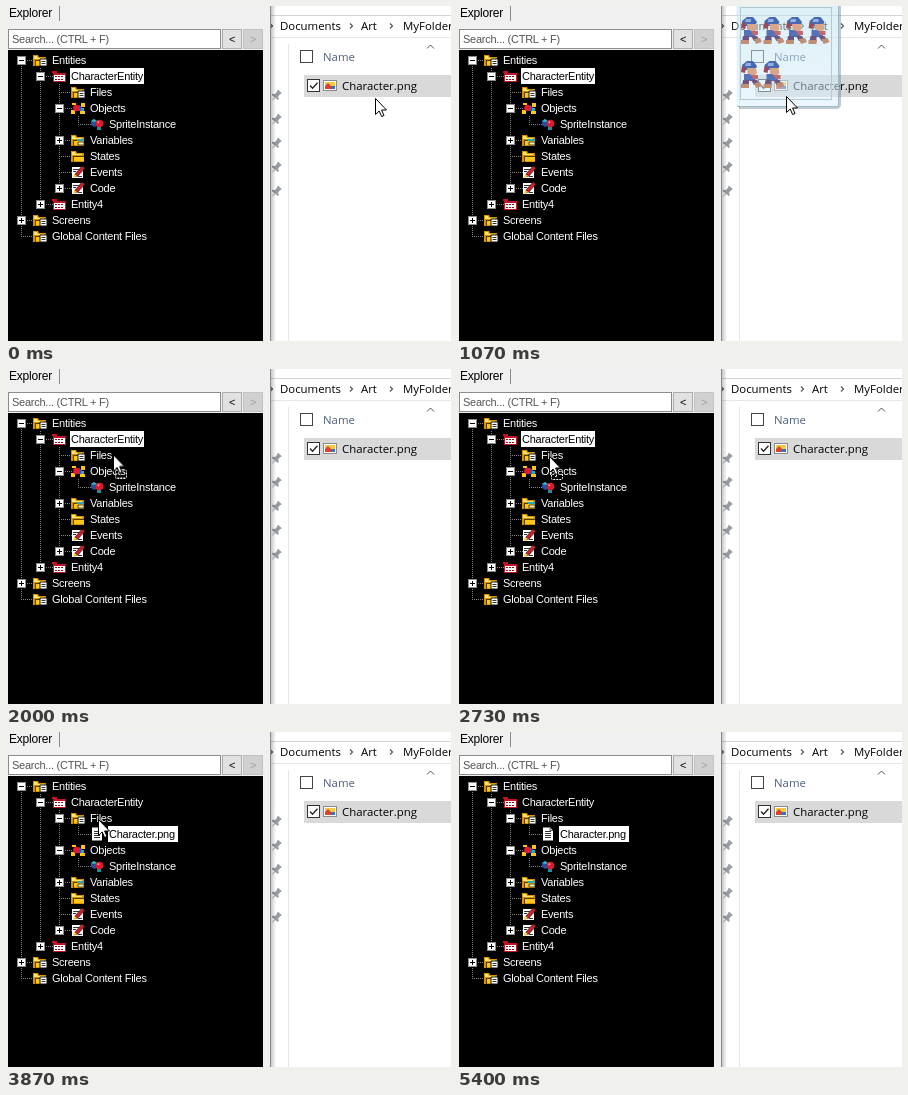
An HTML page for the animation above (5990 ms loop, 445 by 335 pixels).

```html
<!DOCTYPE html>
<html lang="en">
<head>
<meta charset="utf-8">
<title>Drag a file into the tree</title>
<style>
html, body { margin: 0; width: 100%; height: 100%; overflow: hidden; background: #fff; }
svg { display: block; width: 445px; height: 335px; }
text { font: 11.4px "Open Sans", "Noto Sans", sans-serif; fill: #000; }
.ui text { font: 11px "Liberation Sans", Arial, sans-serif; letter-spacing: -.25px; }
.tree text { fill: #fff; }
.tree .sel text { fill: #000; }
.crisp { shape-rendering: crispEdges; }
.dots { stroke: #858585; stroke-dasharray: 1 1; fill: none; }

/* One loop is 5.99 s, drawn at 15 steps per second. */
.anim { animation: 5.99s step-end infinite; }
#cursor { animation-name: move; }
#thumb { animation-name: thumb; }
#ghosts { animation-name: ghosts; }
#badge { animation-name: badge; }
#hover { animation-name: hover; }
#before { animation-name: before; }
#after { animation-name: after; }
#after .old { animation-name: oldSel; }
#after .new { animation-name: newSel; }

@keyframes move {
  0% { transform: translate(369px, 92px); animation-timing-function: steps(3); }
  3.27% { transform: translate(362px, 87px); }
  11.06% { transform: translate(362px, 87px); animation-timing-function: steps(2); }
  13.29% { transform: translate(353px, 87px); animation-timing-function: steps(4); }
  17.74% { transform: translate(329px, 90px); animation-timing-function: steps(2); }
  19.97% { transform: translate(303px, 92px); }
  21.08% { transform: translate(267px, 94px); }
  22.19% { transform: translate(235px, 97px); animation-timing-function: steps(4); }
  26.64% { transform: translate(152px, 96px); animation-timing-function: steps(4); }
  31.1% { transform: translate(112px, 89px); animation-timing-function: steps(4); }
  35.55% { transform: translate(102px, 82px); animation-timing-function: steps(5); }
  41.11% { transform: translate(94px, 96px); animation-timing-function: steps(4); }
  45.57% { transform: translate(92px, 87px); }
  82.29% { transform: translate(92px, 87px); animation-timing-function: steps(3); }
  85.63% { transform: translate(82px, 130px); animation-timing-function: steps(3); }
  88.97% { transform: translate(40px, 298px); }
  90.08%, 100% { transform: translate(40px, 400px); }
}
@keyframes thumb {
  0% { opacity: 0; }
  12.18% { opacity: .5; }
  13.29% { opacity: .9; }
  14.4%, 15.51% { opacity: 1; }
  22.19%, 100% { opacity: 0; }
}
@keyframes ghosts {
  0% { opacity: 0; }
  14.4% { opacity: .5; }
  15.51%, 100% { opacity: 1; }
}
@keyframes badge { 0% { opacity: 0; } 22.19% { opacity: 1; } 58.92%, 100% { opacity: 0; } }
@keyframes hover { 0% { opacity: 0; } 1.05% { opacity: 1; } 12.18%, 100% { opacity: 0; } }
@keyframes before { 0% { opacity: 1; } 61.15%, 100% { opacity: 0; } }
@keyframes after { 0% { opacity: 0; } 61.15%, 100% { opacity: 1; } }
@keyframes oldSel { 0% { opacity: 1; } 64.49%, 100% { opacity: 0; } }
@keyframes newSel { 0% { opacity: 0; } 64.49%, 100% { opacity: 1; } }
</style>
</head>
<body>
<svg viewBox="0 0 445 335">
  <defs>
    <linearGradient id="edge">
      <stop offset="0" stop-color="#000" stop-opacity=".22"/>
      <stop offset="1" stop-color="#000" stop-opacity="0"/>
    </linearGradient>
    <linearGradient id="glass" x2="0" y2="1">
      <stop offset="0" stop-color="#b9e0f0"/>
      <stop offset="1" stop-color="#d8eef8"/>
    </linearGradient>

    <!-- tree icons, 14 by 13 around the centre -->
    <g id="folder">
      <path d="M-7-5h5l1 2h7v9H-7z" fill="#d89400"/>
      <path d="M-6-4h3l1 2h6v1H-6z" fill="#ffe56a"/>
      <path d="M-5 0H6v1H-4v5h-1z" fill="#5a3c00"/>
      <path d="M-4 1H6v4H-4z" fill="#ffc61a"/>
    </g>
    <g id="folderDoc">
      <use href="#folder"/>
      <path d="M0-1h7v7H0z" fill="#fff" stroke="#111"/>
      <path d="M1.500 1.500h4M1.500 3.500h4" stroke="#333"/>
    </g>
    <g id="folderVar">
      <use href="#folder"/>
      <path d="M-1-1h7v2h-7z" fill="#25a8b8"/>
      <path d="M0 2h6v3H0z" fill="#fff2a0" stroke="#222" stroke-width=".8"/>
    </g>
    <g id="entity">
      <path d="M-7-5h5v2h9v9H-6v-9h-1z" fill="#c01424"/>
      <path d="M-5-1H6v6H-5z" fill="#fff"/>
      <path d="M-4 .5h2m1 0h2m1 0h2M-4 3.500h2m1 0h2m1 0h2" stroke="#8c0c1c"/>
    </g>
    <g id="balls">
      <path d="M-6-5h4v2h-4zM3-5h4v4H3zM-7 2h4v4h-4zM2 3h5v3H2z" fill="#ffc61a"/>
      <path d="M1-3l3 2-1 4H0z" fill="#2a55cc"/>
      <path d="M3 0h3v3H3z" fill="#25a8b8"/>
      <circle cx="-1.500" cy="0" r="3.300" fill="#e01b2c"/>
    </g>
    <g id="ball">
      <path d="M-6-3l3-2 3 2v5l-3 1-3-2z" fill="#24509f"/>
      <path d="M-6-3l3-2 3 2-3 1z" fill="#35b5c4"/>
      <path d="M0 2h4v4H0z" fill="#1f8f9f"/>
      <circle cx="2.500" cy="-.5" r="3.800" fill="#e01b2c"/>
      <circle cx="1.300" cy="-1.800" r="1" fill="#ff9a9a"/>
    </g>
    <g id="code">
      <path d="M-6-5H3l2 2v9H-6z" fill="#fff"/>
      <path d="M-5-2.500h6M-5-.5h3M0 4.500h4" stroke="#333"/>
      <path d="M-3 2L4-6l3 2-7 8-4 1z" fill="#c8202c" stroke="#111" stroke-width=".6"/>
      <path d="M-4 2l3 2-4 2z" fill="#ffd33a"/>
    </g>
    <g id="doc">
      <path d="M-5-6.500h7l3 3v10H-5z" fill="#fff"/>
      <path d="M-3-2.500h6M-3-.5h6M-3 1.500h6M-3 3.500h6" stroke="#333"/>
      <path d="M2-6.500v3h3" fill="none" stroke="#555"/>
    </g>
    <g id="pin" fill="#969ca2" transform="rotate(40)">
      <path d="M-2.500-6h5v1.500H2V-1l2 1.500V2H-4V.5l2-1.500v-3.500h-.5z"/>
      <path d="M-.6 2H.6L0 7z"/>
    </g>
    <g id="ghost">
      <path d="M-9-10l5-4h6l4 5-2 4H-8z" fill="#4769b4"/>
      <path d="M-5-12h5v3h-6z" fill="#93aee0"/>
      <path d="M-9-9l4 2-1 5-4-1z" fill="#9a4a58"/>
      <path d="M-4-7h9l1 5-3 3h-6z" fill="#d8a78b"/>
      <path d="M-7-1h5l5 2 2 5H-7z" fill="#5571b8"/>
      <path d="M0 0h7v4H2z" fill="#c06a70"/>
      <path d="M-8 5h6v6h-7zM0 5h6l3 5H3z" fill="#6c5580"/>
      <path d="M-10 9h8v4h-8zM3 8l6-1 2 4-6 2z" fill="#c08e74"/>
    </g>
  </defs>

  <!-- file window -->
  <g>
    <rect x="264" width="181" height="335" fill="#fff"/>
    <path class="crisp" d="M265 9.500H445" stroke="#d4d4d4"/>
    <path class="crisp" d="M265 31.500H445M282.500 38V335" stroke="#e6e6e6"/>
    <g fill="none" stroke="#555" stroke-width="1.200">
      <path d="M264 17.500l2.500 2.500-2.500 2.500M344 17.500l2.500 2.500-2.500 2.500M384 17.500l2.500 2.500-2.500 2.500"/>
      <path d="M421 42.500l3.500-3.500 3.500 3.500" stroke-width="1"/>
    </g>
    <text x="274" y="24">Documents</text>
    <text x="355" y="24">Art</text>
    <text x="397" y="24">MyFolder</text>
    <g id="pins"></g>
    <rect x="294.500" y="44.500" width="12" height="12" fill="#fff" stroke="#444"/>
    <text x="317" y="55" style="fill:#4c607a">Name</text>
    <rect x="298" y="69" width="147" height="22" fill="#d9d9d9"/>
    <g id="hover" class="anim">
      <rect x="297.500" y="69.500" width="150" height="21" fill="#cce8ff" stroke="#99d1ff"/>
    </g>
    <rect x="301.500" y="73.500" width="12" height="12" fill="#fff" stroke="#333"/>
    <path d="M304 79.500l2.500 2.700 5-5.500" fill="none" stroke="#222" stroke-width="1.300"/>
    <rect x="317.500" y="74.500" width="13" height="10" fill="#fff" stroke="#8a8a8a"/>
    <path d="M319 76h10v7h-10z" fill="#f6c945"/>
    <path d="M319 80l3-3 3 3v3h-6z" fill="#d8452e"/>
    <path d="M325 80h4v3h-4z" fill="#3b6fc4"/>
    <text x="336" y="84">Character.png</text>
    <rect x="265" width="5" height="335" fill="url(#edge)"/>
  </g>

  <!-- tree window -->
  <g class="ui">
    <rect width="264" height="335" fill="#f0f0f0"/>
    <path class="crisp" d="M264.500 0V335" stroke="#8a8a8a"/>
    <path class="crisp" d="M53.500 0V15" stroke="#8c8c8c"/>
    <text x="3" y="11" style="font-size:12px;letter-spacing:-.2px">Explorer</text>
    <g class="crisp">
      <rect x="2.500" y="23.500" width="212" height="19" fill="#fff" stroke="#8c8c8c"/>
      <rect x="216.500" y="23.500" width="19" height="19" fill="#e1e1e1" stroke="#adadad"/>
      <rect x="237.500" y="23.500" width="19" height="19" fill="#d0d0d0" stroke="#c3c3c3"/>
    </g>
    <text x="6" y="37" style="fill:#555">Search... (CTRL + F)</text>
    <text x="223" y="37">&lt;</text>
    <text x="244" y="37" style="fill:#a0a0a0">&gt;</text>
    <rect x="2" y="44" width="255" height="291" fill="#000"/>
    <g id="before" class="tree anim"></g>
    <g id="after" class="tree anim"></g>
  </g>

  <g id="cursor" class="anim">
    <g id="thumb" class="anim">
      <path d="M53.500-90V9.500l-2 2H-47" fill="none" stroke="#50687a" stroke-opacity=".35" stroke-width="3"/>
      <rect x="-49.500" y="-92.500" width="102" height="103" rx="2" fill="url(#glass)" fill-opacity=".5"/>
      <path d="M52.500-92V10.500H-49" fill="none" stroke="#9db8c8"/>
      <g id="ghosts" class="anim">
        <rect x="-45.500" y="-88.500" width="91" height="92" fill="none" stroke="#b4c9d6"/>
      </g>
    </g>
    <g id="badge" class="anim">
      <rect x="2.500" y="15.500" width="11" height="8" rx="1" fill="none" stroke="#000"/>
      <rect x="2.500" y="15.500" width="11" height="8" rx="1" fill="none" stroke="#fff" stroke-dasharray="2 1"/>
    </g>
    <path d="M.5.5V16.500L4.200 13 6.600 18.500 9 17.500 6.600 12H11.500Z" fill="#fff" stroke="#000"/>
  </g>
</svg>
<script>
const byId = id => document.getElementById(id);
const use = (id, x, y) => `<use href="#${id}" x="${x}" y="${y}"/>`;

// label, level, icon, expander, label width when selected, selection class
const head = [
  ['Entities', 0, 'folderDoc', '-'],
  ['CharacterEntity', 1, 'entity', '-', 74, 'old']
];
const tail = [
  ['Objects', 2, 'balls', '-'],
  ['SpriteInstance', 3, 'ball'],
  ['Variables', 2, 'folderVar', '+'],
  ['States', 2, 'folder'],
  ['Events', 2, 'code'],
  ['Code', 2, 'code', '+'],
  ['Entity4', 1, 'entity', '+'],
  ['Screens', 0, 'folderDoc', '+'],
  ['Global Content Files', 0, 'folderDoc']
];
const closed = [...head, ['Files', 2, 'folderDoc'], ...tail];
const open = [...head, ['Files', 2, 'folderDoc', '-'],
  ['Character.png', 3, 'doc', '', 70, 'new'], ...tail];

function expander(x, y, sign) {
  const bar = sign === '+' ? `M${x + .5} ${y - 2}v5` : '';
  return `<g class="crisp"><rect x="${x - 4}" y="${y - 4}" width="9" height="9" fill="#8c8c8c"/>
    <rect x="${x - 3}" y="${y - 3}" width="7" height="7" fill="#fff"/>
    <path d="M${x - 2} ${y + .5}h5${bar}" stroke="#000"/></g>`;
}

function tree(rows) {
  let lines = '', items = '';
  const lastY = [];
  rows.forEach(([label, level, icon, sign, width, sel], i) => {
    const x = 15 + 19 * level, y = 54 + 16 * i;
    const from = lastY[level] ?? y - (i ? 8 : 0);
    lines += `M${x + .5} ${from}V${y}M${x} ${y + .5}H${x + 13}`;
    lastY[level] = y;
    lastY.length = level + 1;
    const text = `<text x="${x + 31}" y="${y + 4}">${label}</text>`;
    items += (sign ? expander(x, y, sign) : '') + use(icon, x + 19, y) + text;
    if (sel) items += `<g class="sel anim ${sel}">
      <rect x="${x + 30}" y="${y - 8}" width="${width}" height="16" fill="#fff"/>${text}</g>`;
  });
  return `<path class="dots crisp" d="${lines}"/>${items}`;
}

byId('before').innerHTML = tree(closed);
byId('after').innerHTML = `<rect x="3" y="45" width="253" height="289"/>` + tree(open);
byId('pins').innerHTML = [0, 1, 2, 3, 4].map(i =>
  `<g transform="translate(270 ${90 + 24 * i})"><use href="#pin"/></g>`).join('');
byId('ghosts').innerHTML += [0, 1, 2, 3, 4, 5].map(i =>
  use('ghost', -35 + 22.5 * (i % 4), i < 4 ? -65 : -21)).join('');
</script>
</body>
</html>
```
